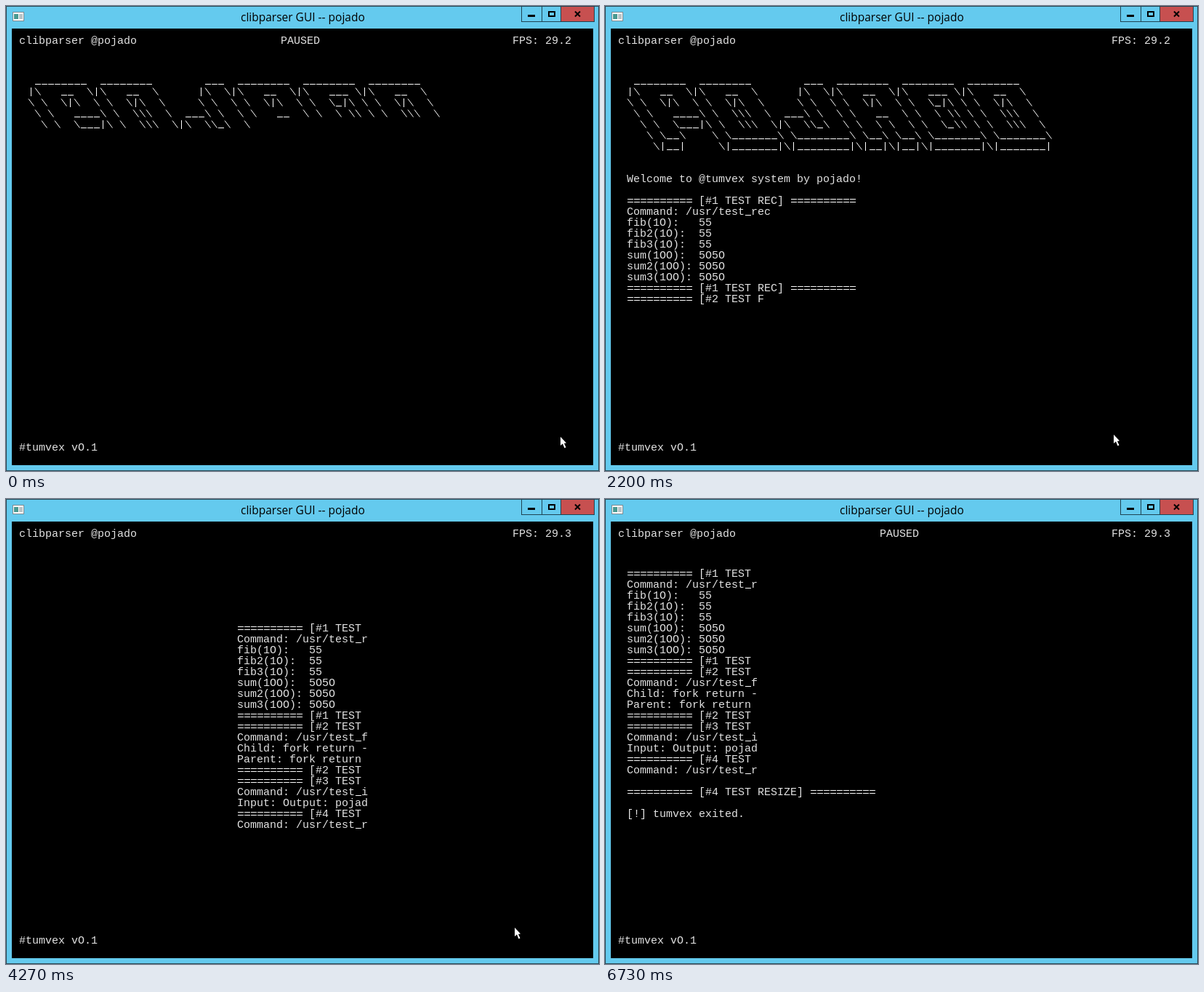
Recreate the animation shown at these times as an HTML page with a canvas. Size 816x639 px, loop 6790 ms.

```html
<!DOCTYPE html>
<html lang="en">
<head>
<meta charset="utf-8">
<title>clibparser GUI</title>
<style>
  html, body { margin: 0; width: 100%; height: 100%; overflow: hidden; background: #64caee; }
  canvas { display: block; }
</style>
</head>
<body>
<canvas id="stage" width="816" height="639"></canvas>
<script>
const ctx = document.getElementById("stage").getContext("2d");
const LOOP = 6790, CELL = 9, PITCH = 14.98;

const banner = String.raw`
 ________  ________        ___  ________  ________  ________
|\   __  \|\   __  \      |\  \|\   __  \|\   ___ \|\   __  \
\ \  \|\  \ \  \|\  \     \ \  \ \  \|\  \ \  \_|\ \ \  \|\  \
 \ \   ____\ \  \\\  \  ___\ \  \ \   __  \ \  \ \\ \ \  \\\  \
  \ \  \___|\ \  \\\  \|\  \\_\  \ \  \ \  \ \  \_\\ \ \  \\\  \
   \ \__\    \ \_______\ \________\ \__\ \__\ \_______\ \_______\
    \|__|     \|_______|\|________|\|__|\|__|\|_______|\|_______|
`.split("\n").slice(1, -1);

const bar = "=".repeat(10);
const rule = label => `${bar} [#${label}] ${bar}`;
const lines = [
  ...banner, "", "",
  "Welcome to @tumvex system by pojado!", "",
  rule("1 TEST REC"), "Command: /usr/test_rec",
  "fib(10):   55", "fib2(10):  55", "fib3(10):  55",
  "sum(100):  5050", "sum2(100): 5050", "sum3(100): 5050",
  rule("1 TEST REC"),
  rule("2 TEST FORK"), "Command: /usr/test_fork",
  "Child: fork return -1", "Parent: fork return 3",
  rule("2 TEST FORK"),
  rule("3 TEST INPUT"), "Command: /usr/test_input", "Input: Output: pojado",
  rule("4 TEST RESIZE"), "Command: /usr/test_resize"
];
const output = lines.join("\n");
const narrow = lines.slice(11).map(line => line.slice(0, 20));
const ending = "\n" + rule("4 TEST RESIZE") + "\n\n[!] tumvex exited.";

// Printing bursts: start, end, and the text each one ends with
const bursts = [
  [-70, 0, String.raw`\|\  \\_\  \ `],
  [0, 130, banner[4]],
  [200, 870, "fib2(10):"],
  [930, 1400, "sum(100):"],
  [1530, 2200, "[#2 TEST F"],
  [2200, 2270, "return -1"],
  [2530, 3200, "test_resize"]
].map(([from, to, text]) => [from, to, output.indexOf(text) + text.length]);

const progress = (time, from, to) => Math.max(0, Math.min(1, (time - from) / (to - from)));

function typedLength(time) {
  let length = 0;
  for (const [from, to, end] of bursts) length += (end - length) * progress(time, from, to);
  return Math.floor(length);
}

function box(color, x, y, w, h) {
  ctx.fillStyle = color;
  ctx.fillRect(x, y, w, h);
}

function drawRow(text, x, middle) {
  const base = middle + 5;
  ctx.fillStyle = "#e2e2e2";
  ctx.font = '15px "Liberation Mono", monospace';
  // The letter O stands for a zero without a dot
  ctx.fillText(text.replace(/[_\\|=]/g, " ").replace(/0/g, "O"), x, base);

  ctx.fillStyle = ctx.strokeStyle = "#fff";
  ctx.lineWidth = 1;
  ctx.beginPath();
  [...text].forEach((char, i) => {
    const left = x + i * CELL;
    if (char === "_") ctx.fillRect(left + 1, base, 8, 1);
    if (char === "|") ctx.fillRect(left + 4, base - 10, 1, 12);
    if (char === "=") {
      ctx.fillRect(left + 1, middle - 2, 8, 1);
      ctx.fillRect(left + 1, middle + 2, 8, 1);
    }
    if (char === "\\") {
      ctx.moveTo(left + 1, base - 9.5);
      ctx.lineTo(left + 8.5, base + 0.5);
    }
  });
  ctx.stroke();
}

function drawRows(rows, x, top, first = 0) {
  rows.forEach((row, i) => {
    if (i >= first) drawRow(row, x, Math.round(top + 0.03 + i * PITCH));
  });
}

function drawWindow() {
  box("#2b4955", 0, 0, 816, 639);
  box("#64caee", 1, 1, 814, 637);
  box("#000", 8, 31, 800, 600);

  box("#7d8a90", 9, 8, 16, 13);
  box("#fff", 10, 9, 14, 11);
  box("#4a9a92", 11, 11, 6, 7);
  box("#b9c4c8", 18, 11, 5, 7);

  ctx.fillStyle = "#000";
  ctx.font = '15.5px "Open Sans", sans-serif';
  ctx.fillText("clibparser GUI -- pojado", 323, 21);

  box("#c75050", 764, 1, 45, 20);
  ctx.strokeStyle = "#1f4453";
  ctx.lineWidth = 1;
  for (const [x, w] of [[709, 28], [737, 26], [763, 46]]) ctx.strokeRect(x + 0.5, 0.5, w, 21);
  box("#000", 718, 12, 10, 3);
  ctx.strokeStyle = "#000";
  ctx.lineWidth = 2;
  ctx.strokeRect(747, 8, 8, 6);
  ctx.beginPath();
  ctx.moveTo(783, 7.5); ctx.lineTo(790, 14.5);
  ctx.moveTo(790, 7.5); ctx.lineTo(783, 14.5);
  ctx.stroke();
}

function drawPointer(time) {
  const arrive = progress(time, 200, 600), leave = progress(time, 6070, 6330);
  ctx.save();
  ctx.translate(Math.round(763 - 63 * arrive + 4 * leave), Math.round(592 - 3 * arrive + 22 * leave));
  ctx.fillStyle = "#fff";
  ctx.fill(new Path2D("M0 0V12L3 9.5 5.5 15.5 7.5 14.5 5 9 8 8.5Z"));
  ctx.restore();
}

// The rate flickers by a tenth now and then, with one longer dip
function fps(tick, time) {
  if (time >= 3600 && time < 3930) return "28.9";
  const phase = tick % 37;
  return phase > 24 && phase < 32 && phase % 2 ? "29.3" : "29.2";
}

function drawConsole(tick, time) {
  drawRow("clibparser @pojado", 18, 47);
  if (time < 70 || time >= 6270) drawRow("PAUSED", 378, 47);
  drawRow("FPS: " + fps(tick, time), 697, 47);
  drawRow("#tumvex v0.1", 18, 606);

  if (time < 3270) {
    drawRows(output.slice(0, typedLength(time)).split("\n"), 30, 102);
  } else if (time < 4270) {
    drawRows(lines, 8, 87, 1);
  } else if (time < 5330) {
    drawRows(narrow, 318, 177);
  } else {
    const typed = Math.floor(ending.length * progress(time, 5330, 5470));
    drawRows([...narrow, ...ending.slice(0, typed).split("\n")], 30, 102);
  }
}

function draw(now) {
  // The screen refreshes 15 times a second
  const tick = Math.floor((now % LOOP + 4) * 15 / 1000);
  const time = Math.round(tick * 20 / 3) * 10;
  drawWindow();
  drawConsole(tick, time);
  if (time < 6400) drawPointer(time);
  requestAnimationFrame(draw);
}

requestAnimationFrame(draw);
</script>
</body>
</html>
```
